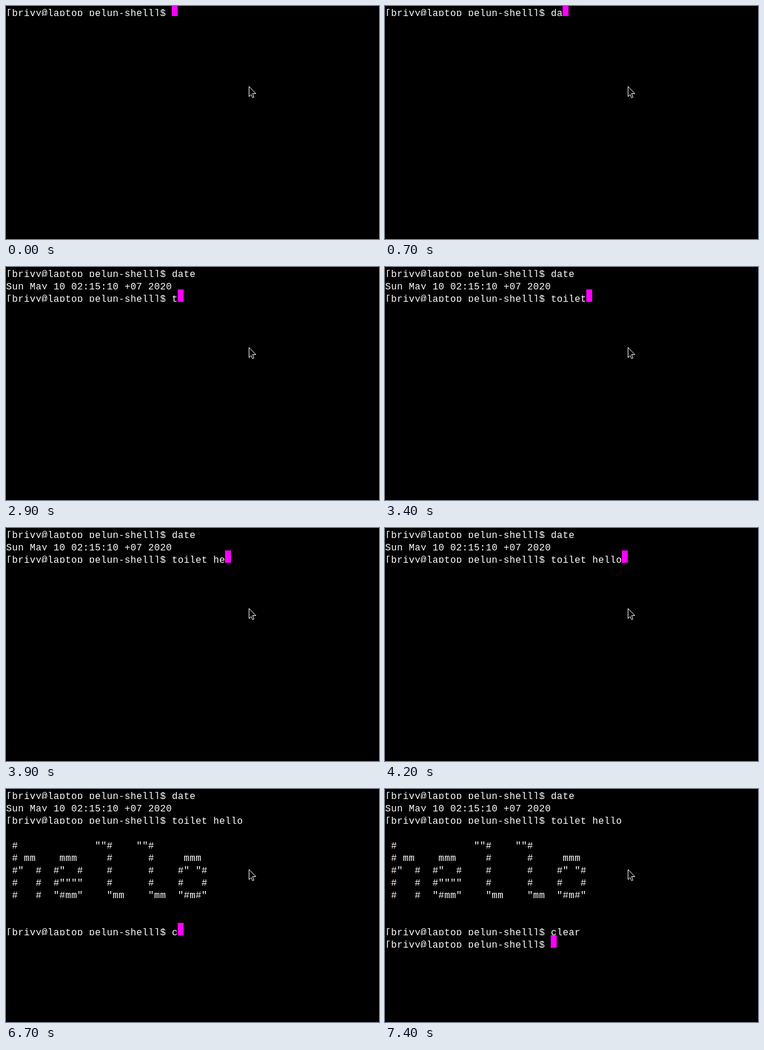
An HTML page with a canvas for the animation above (8000 ms loop, 630 by 395 pixels).

```html
<!DOCTYPE html>
<html lang="en">
<head>
<meta charset="utf-8">
<title>Terminal session</title>
<style>
html, body { margin: 0; width: 100%; height: 100%; overflow: hidden; background: #000; }
canvas { display: block; }
</style>
</head>
<body>
<canvas width="630" height="395"></canvas>
<script>
const ctx = document.querySelector('canvas').getContext('2d');
const LOOP = 8000, CELL_W = 10, CELL_H = 21, BASE = 17;
const PROMPT = '[brivy@laptop pelun-shell]$ ';

const BANNER = [
  '',
  ' #             ""#    ""#',
  ' # mm    mmm     #      #     mmm',
  ' #"  #  #"  #    #      #    #" "#',
  ' #   #  #""""    #      #    #   #',
  ' #   #  "#mm"    "mm    "mm  "#m#"',
  '', ''
];

// Each command: [time, characters typed so far], then Enter and its output.
const COMMANDS = [
  { text: 'date', keys: [[500, 1], [700, 2], [800, 4]],
    enter: 1100, output: ['Sun May 10 02:15:10 +07 2020'] },
  { text: 'toilet hello',
    keys: [[2900, 1], [3000, 2], [3200, 3], [3300, 4], [3400, 6], [3500, 7],
           [3800, 8], [3900, 9], [4000, 10], [4100, 11], [4200, 12]],
    enter: 4500, output: BANNER },
  { text: 'clear', keys: [[6700, 1], [6900, 2], [7000, 3], [7100, 5]],
    enter: 7400, output: [] }
];

function screenAt(t) {
  const lines = [];
  for (const { text, keys, enter, output } of COMMANDS) {
    const count = keys.reduce((n, [at, typed]) => t >= at ? typed : n, 0);
    lines.push(PROMPT + text.slice(0, count));
    if (t < enter) return lines;
    lines.push(...output);
  }
  lines.push(PROMPT);
  return lines;
}

// Letters stay inside their row, so descenders are cut off.
function drawLine(line, row) {
  const bottom = row * CELL_H + BASE;
  ctx.save();
  ctx.beginPath();
  ctx.rect(0, bottom - CELL_H, 630, CELL_H);
  ctx.clip();
  [...line].forEach((ch, col) => ctx.fillText(ch, (col + 0.5) * CELL_W, bottom));
  ctx.restore();
}

function drawPointer() {
  const arrow = new Path2D('M410.5 136.5V153.5L414 150.2L416.6 155.5L418.8 154.5L416.5 148.5H422Z');
  ctx.fillStyle = '#000';
  ctx.fill(arrow);
  ctx.strokeStyle = '#fff';
  ctx.lineWidth = 1;
  ctx.stroke(arrow);
}

function draw(t) {
  const lines = screenAt(t), last = lines.length - 1;
  ctx.fillStyle = '#000';
  ctx.fillRect(0, 0, 630, 395);
  ctx.font = '16px "Liberation Mono", monospace';
  ctx.textAlign = 'center';
  ctx.fillStyle = '#fff';
  lines.forEach(drawLine);
  ctx.fillStyle = '#f0f';
  ctx.fillRect(lines[last].length * CELL_W, last * CELL_H + BASE - CELL_H, CELL_W, CELL_H);
  drawPointer();
}

const start = performance.now();
function tick() {
  draw((performance.now() - start) % LOOP);
  requestAnimationFrame(tick);
}
tick();
</script>
</body>
</html>
```
